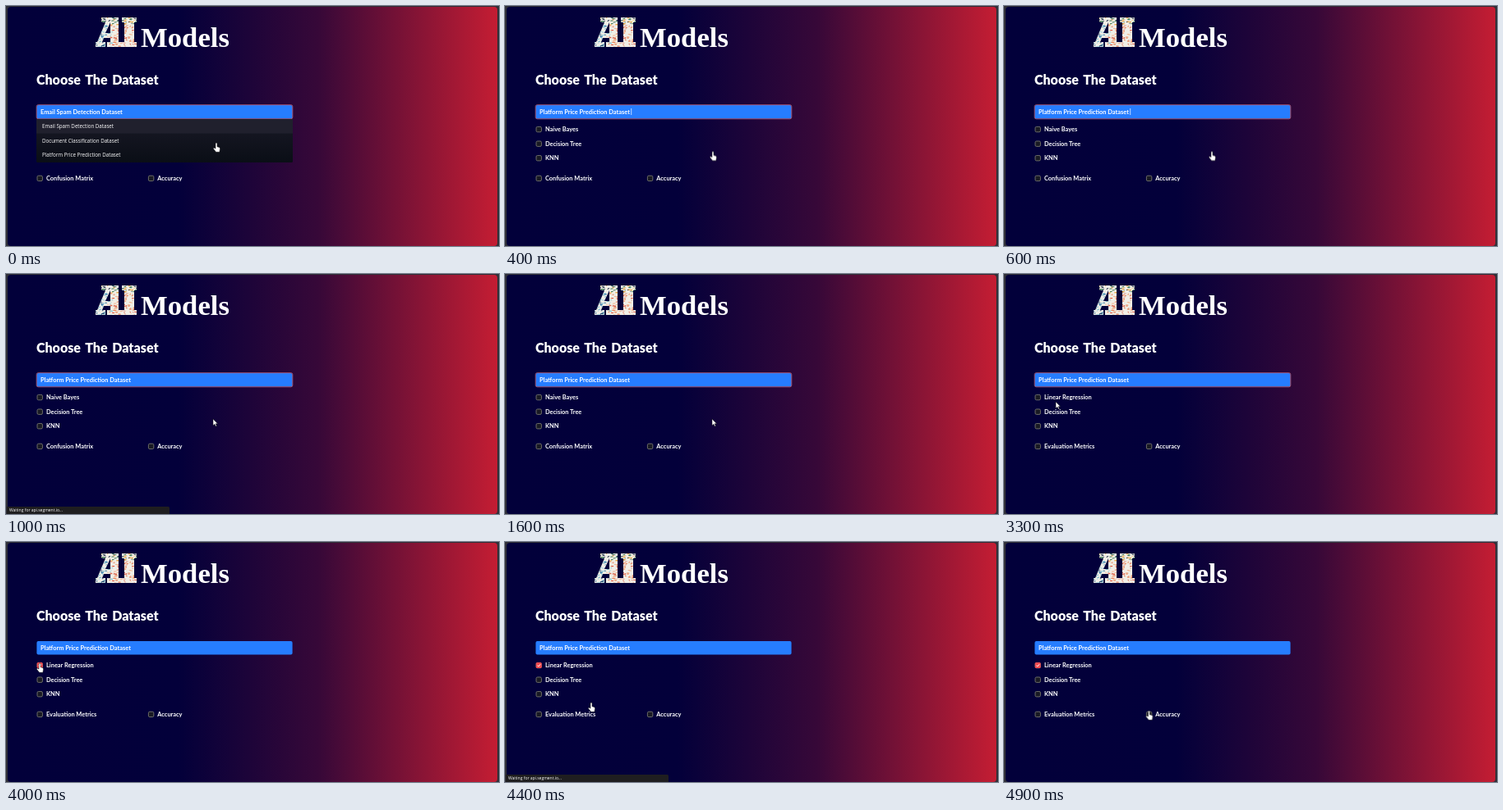
Animation, 600 px wide and 293 px high, one loop 5 s. Source, as an HTML page:

```html
<!DOCTYPE html>
<html lang="en">
<head>
<meta charset="utf-8">
<title>AI Models</title>
<style>
  html, body { margin: 0; width: 100%; height: 100%; overflow: hidden; background: #303038; }
  svg { display: block; width: 100vw; height: 100vh; }
  text { fill: #fff; white-space: pre; }
  .title { font: 700 34.7px "Liberation Serif", serif; }
  .head { font: 900 16px "Comic Sans MS", Lato, sans-serif; word-spacing: 2px; }
  .label { font: 700 7.4px "Comic Sans MS", Lato, sans-serif; }
  .option { font: 6.2px "Open Sans", sans-serif; }
  .status { font: 5px "Open Sans", sans-serif; }

  .anim * { animation-duration: 5s; animation-iteration-count: infinite; }
  .flip { animation-timing-function: step-end; }

  .menu { animation-name: menu; }
  .picked { animation-name: picked; }
  .hover { animation-name: hover; }
  .caret { animation-name: caret; }
  .before { animation-name: before; }
  .after { animation-name: after; }
  .focus { animation-name: focus; }
  .tick { animation-name: tick; }
  .note { animation-name: note; }
  .hand { animation-name: hand; }
  .arrow { animation-name: arrow; }
  .pointer { animation-name: move; }

  @keyframes menu { 0% { opacity: 1 } 8%, 100% { opacity: 0 } }
  @keyframes picked { 0% { opacity: 0 } 8%, 100% { opacity: 1 } }
  @keyframes hover { 0% { transform: none } 4%, 100% { transform: translateY(35.4px) } }
  @keyframes caret { 0% { opacity: 0 } 8% { opacity: 1 } 20%, 100% { opacity: 0 } }
  @keyframes before { 0% { opacity: 1 } 42%, 100% { opacity: 0 } }
  @keyframes after { 0% { opacity: 0 } 42%, 100% { opacity: 1 } }
  @keyframes focus { 0% { opacity: 1 } 78%, 100% { opacity: 0 } }
  @keyframes tick { 0% { opacity: 0 } 78%, 100% { opacity: 1 } }
  @keyframes note { 0% { opacity: 0 } 20% { opacity: 1 } 30% { opacity: 0 } 82% { opacity: 1 } 98%, 100% { opacity: 0 } }
  @keyframes hand { 0% { opacity: 1 } 16% { opacity: 0 } 72%, 100% { opacity: 1 } }
  @keyframes arrow { 0% { opacity: 0 } 16% { opacity: 1 } 72%, 100% { opacity: 0 } }
  /* one step per 100 ms */
  @keyframes move {
    0% { transform: translate(256px, 167px); animation-timing-function: steps(3, end) }
    6% { transform: translate(253px, 177.5px); animation-timing-function: step-end }
    16% { transform: translate(252px, 177px); animation-timing-function: step-end }
    56% { transform: translate(252px, 177px); animation-timing-function: steps(5, end) }
    66% { transform: translate(63px, 156px); animation-timing-function: steps(3, end) }
    72% { transform: translate(41px, 148px); animation-timing-function: step-end }
    82% { transform: translate(41px, 148px); animation-timing-function: steps(3, end) }
    88% { transform: translate(105px, 196px); animation-timing-function: steps(5, end) }
    98%, 100% { transform: translate(176.5px, 206px); animation-timing-function: step-end }
  }
</style>
</head>
<body>
<svg viewBox="0 0 600 293" preserveAspectRatio="none">
  <defs>
    <linearGradient id="sky">
      <stop offset="0" stop-color="#02003a"/>
      <stop offset=".35" stop-color="#03003a"/>
      <stop offset=".635" stop-color="#370838"/>
      <stop offset="1" stop-color="#c41d33"/>
    </linearGradient>
    <linearGradient id="list" x2="0" y2="1">
      <stop offset="0" stop-color="#191926"/>
      <stop offset="1" stop-color="#0a0e16"/>
    </linearGradient>
    <clipPath id="letters">
      <path clip-rule="evenodd" d="M116 14H137V44H142V50H123V44H127V39H119L117 44H121V50H109V44H111L121 20H116ZM121 33H127V20Z"/>
      <path d="M141 14H159V20H156V44H159V50H141V44H144V20H141Z"/>
    </clipPath>
    <g id="box"><rect x="-3.2" y="-3.2" width="6.4" height="6.4" rx="1.5" fill="#191a24" stroke="#77776f" stroke-width=".9"/></g>
  </defs>

  <rect width="600" height="293" fill="#303038"/>
  <rect x="2" y="1" width="596" height="292" rx="4" fill="url(#sky)"/>

  <g clip-path="url(#letters)" role="img" aria-label="AI">
    <rect x="105" y="10" width="60" height="45" fill="#f1eee6"/>
    <g id="paint"></g>
  </g>
  <text class="title" x="164" y="50">Models</text>
  <text class="head" x="37" y="96">Choose The Dataset</text>

  <g class="anim">
    <rect x="37.4" y="120.9" width="311.2" height="16.7" rx="2" fill="#267dff"/>
    <rect class="flip focus" x="37.2" y="120.7" width="311.6" height="17.1" rx="2" fill="none" stroke="#b0607c" stroke-width=".9"/>
    <g class="label">
      <text class="flip menu" x="42" y="131.6">Email Spam Detection Dataset</text>
      <text class="flip picked" x="42" y="131.6">Platform Price Prediction Dataset</text>
    </g>
    <path class="flip caret" d="M153.7 125V133" stroke="#fff" stroke-width=".7"/>

    <use href="#box" x="41.2" y="150.6"/>
    <use href="#box" x="41.2" y="168.2"/>
    <use href="#box" x="41.2" y="185.7"/>
    <use href="#box" x="41.2" y="210.4"/>
    <use href="#box" x="176.6" y="210.4"/>
    <g class="flip tick">
      <rect x="37.7" y="147.1" width="7" height="7" rx="1.5" fill="#f04a50"/>
      <path d="M39.4 150.6L40.7 152L43.1 149.2" fill="none" stroke="#fff"/>
    </g>
    <g class="label">
      <g class="flip before">
        <text x="49" y="153">Naive Bayes</text>
        <text x="49" y="213">Confusion Matrix</text>
      </g>
      <g class="flip after">
        <text x="49" y="153">Linear Regression</text>
        <text x="49" y="213">Evaluation Metrics</text>
      </g>
      <text x="49" y="170.7">Decision Tree</text>
      <text x="49" y="188.2">KNN</text>
      <text x="184.3" y="213">Accuracy</text>
    </g>

    <g class="flip menu option">
      <rect x="37" y="138" width="312" height="53" rx="1.5" fill="url(#list)"/>
      <rect class="flip hover" x="37" y="138" width="312" height="17.6" fill="#20202d"/>
      <text x="44" y="149">Email Spam Detection Dataset</text>
      <text x="44" y="166.5">Document Classification Dataset</text>
      <text x="44" y="184.2">Platform Price Prediction Dataset</text>
    </g>

    <g class="flip note">
      <path d="M1 293V284H197.5Q199 284 199 285.5V293Z" fill="#1f1e20"/>
      <text class="status" x="4" y="290.4">Waiting for api.segment.io...</text>
    </g>

    <g class="pointer" fill="#fff" stroke="#111" stroke-width=".5">
      <path class="flip hand" d="M-1 1A1 1 0 0 1 1 1V4.8L3.4 5.4Q4.7 5.8 4.5 7.4L3.9 11.3H-.4L-3.6 7.3Q-3.7 5.9-2.3 6.2L-1 7.2Z"/>
      <path class="flip arrow" d="M0 0V8L1.9 6.3L3.2 9L4.4 8.5L3.2 5.8H5.6Z"/>
    </g>
  </g>
</svg>
<script>
  // Painted dabs inside the lettering
  let seed = 11;
  const rand = () => (seed = seed * 16807 % 2147483647) / 2147483647;
  const warm = ['#e8a23c', '#3f7d5b', '#25364c', '#f3d98a'];
  const cool = ['#2f78b0', '#62b0c8', '#24486f', '#9ccfdc'];
  const red = ['#d9482f', '#ea7a4c', '#e0a090', '#f2b48e'];
  let dabs = '';
  for (let i = 0; i < 300; i++) {
    const x = 108 + rand() * 54, y = 13 + rand() * 38;
    const set = y < 23 ? warm : x < 122 + rand() * 8 ? cool : red;
    const color = set[Math.floor(rand() * set.length)];
    const dx = 1 + rand() * 2.2, dy = rand() - .5;
    dabs += `<path d="M${x} ${y}l${dx} ${dy}" stroke="${color}"/>`;
  }
  document.getElementById('paint').innerHTML = dabs;
</script>
</body>
</html>
```
